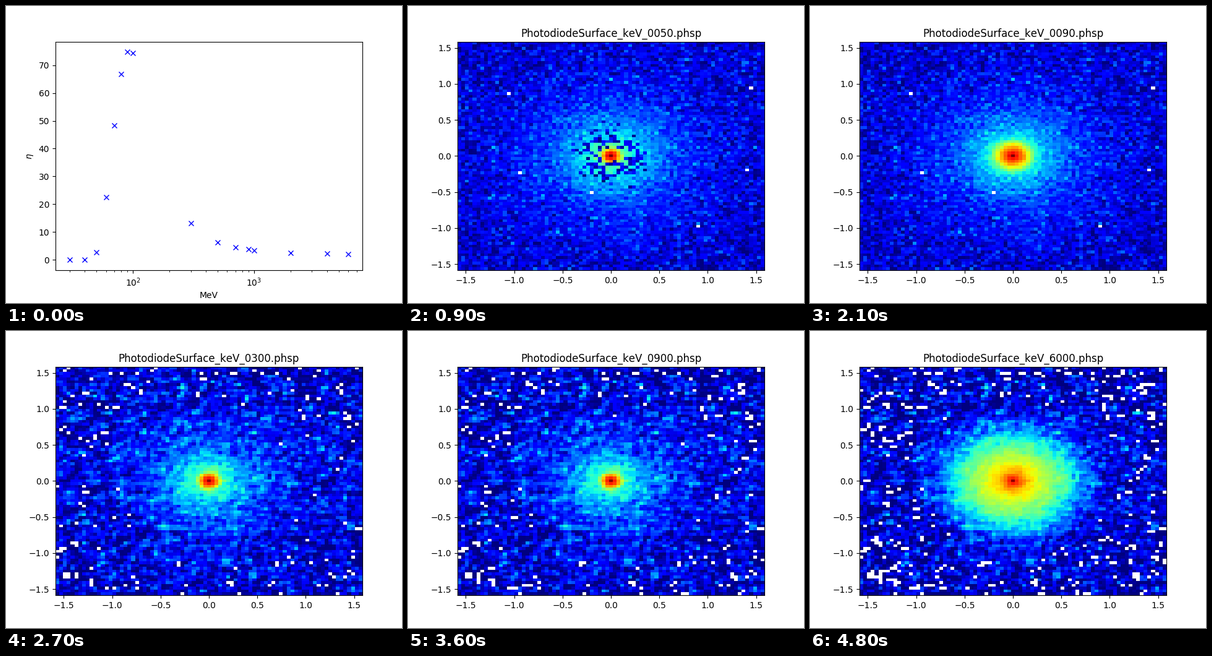
Animation of 640x480 px, one loop 5100 ms. Source, as a matplotlib script:

```python
import numpy as np
import matplotlib.pyplot as plt
from matplotlib.animation import FuncAnimation

plt.rcParams["text.kerning_factor"] = 6

STEP = 300
N = 81
HALF = 1.586

ENERGY = [*range(30, 101, 10), *range(300, 901, 200), 1000, 2000, 4000, 6000]
ETA = [0, 0, 2.7, 22.5, 48.3, 66.8, 74.7, 74.3,
       13.1, 6.3, 4.5, 3.8, 3.5, 2.6, 2.3, 2.2]

rng = np.random.default_rng(12)
axis = (np.arange(N) - N // 2) * 2 * HALF / N
X, Y = np.meshgrid(axis, -axis)
R = np.hypot(X, Y)

# Low energies share fine grain, high energies a slightly clumped one
fine = rng.standard_normal((N, N))
w = rng.standard_normal((N, N))
clumped = (w + .5 * np.roll(w, 1, 1) + .4 * np.roll(w, 1, 0)) / np.sqrt(1.41)

hole_chance = .55 * np.exp(-((R - .24) / .12) ** 2)
holes = rng.random((N, N)) < hole_chance
hole_level = rng.uniform(0, .18, (N, N))


def profile(energy, eta):
    """Colour level by radius: floor, wide halo, flat-topped blob, sharp core."""
    floor = .065 - .02 * np.log10(energy / 50)
    radius = max(.1 + .1 * eta / 75, energy / 8000)
    halo = .5 * np.exp(-R / .5)
    blob = .3 * np.exp(-(R / radius) ** 4)
    core = (.2 - floor) * np.exp(-R / .06)
    return floor + halo + blob + core


def surface(energy, eta):
    base = profile(energy, eta)
    low = energy <= 100
    grain, amount, cutoff = (fine, .08, -3) if low else (clumped, .11, -1.2)
    level = base + amount * np.exp(-3 * base) * grain
    if energy <= 50:
        level = np.where(holes, hole_level, level)
    empty = grain < cutoff if low else level < -.08
    return np.where(empty, np.nan, np.clip(level, 0, 1))


maps = [surface(e, eta) for e, eta in zip(ENERGY, ETA)]

fig = plt.figure(figsize=(6.4, 4.8), dpi=100)
curve = fig.add_subplot(label="curve")
curve.semilogx(ENERGY, ETA, "bx")
curve.set_xlabel("MeV")
curve.set_ylabel(r"$\eta$")

heat = fig.add_subplot(label="heat")
image = heat.imshow(maps[0], cmap="jet", vmin=0, vmax=1, aspect="auto",
                    interpolation="nearest", extent=(-HALF, HALF, -HALF, HALF))
title = heat.set_title("")


def update(i):
    curve.set_visible(i == 0)
    heat.set_visible(i > 0)
    if i:
        image.set_data(maps[i - 1])
        title.set_text(f"PhotodiodeSurface_keV_{ENERGY[i - 1]:04d}.phsp")
    return image, title


anim = FuncAnimation(fig, update, frames=len(ENERGY) + 1, interval=STEP,
                     repeat=True, repeat_delay=0)
plt.show()
```
